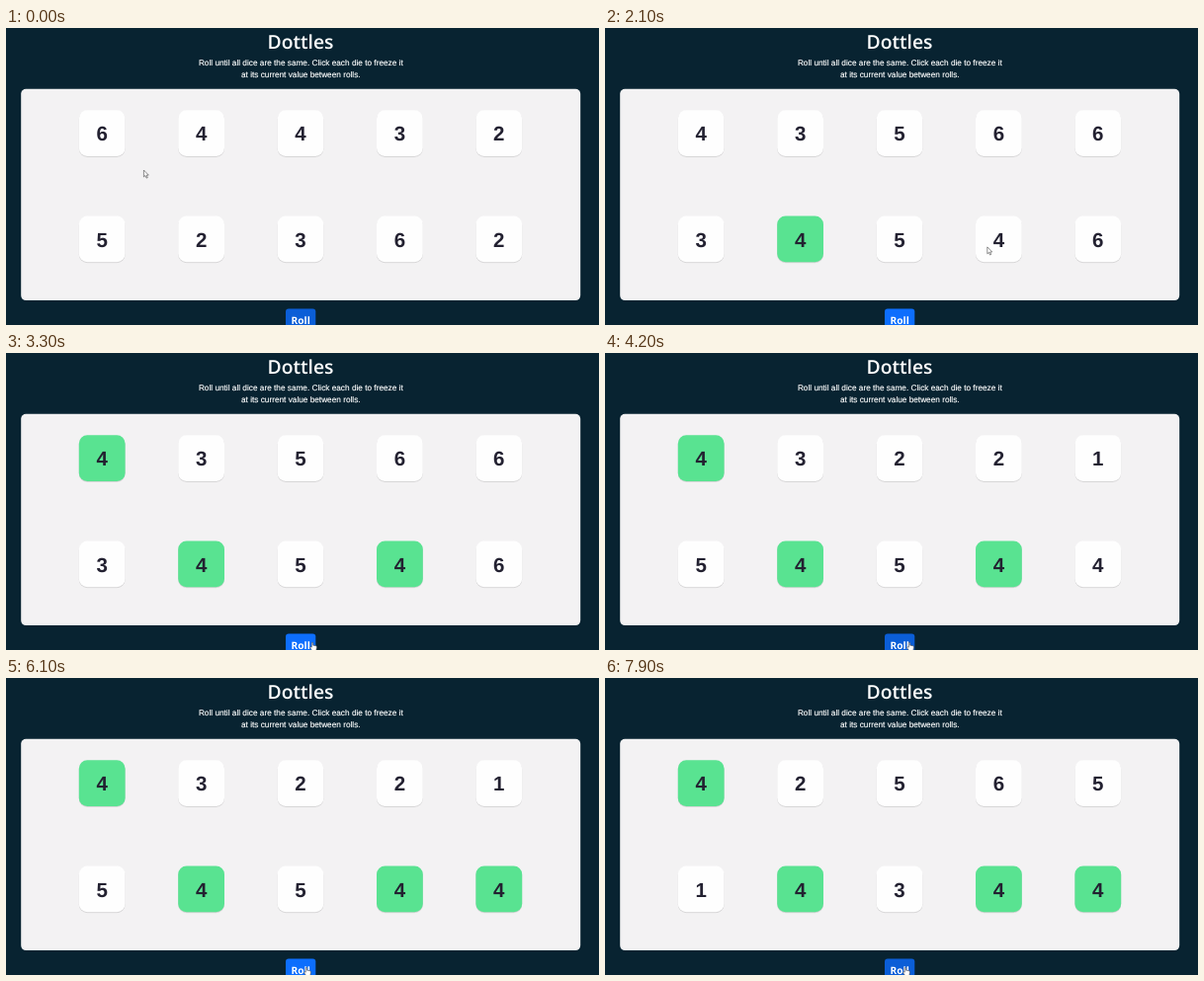
An HTML page that plays this animation: 600 px wide and 301 px high, repeating every 8000 ms.

```html
<!DOCTYPE html>
<html lang="en">
<head>
<meta charset="utf-8">
<title>Dottles</title>
<style>
  html, body { margin: 0; width: 100%; height: 100%; overflow: hidden; background: #082331; }
  svg { display: block; width: 600px; height: 301px; }
  text { text-anchor: middle; fill: #fff; text-rendering: geometricPrecision; }
  .title { font: 600 19.3px "Open Sans", "Noto Sans", sans-serif; }
  .info { font: 8.25px "Liberation Sans", Arial, sans-serif; stroke: #fff; stroke-width: .15px; }
  .label { font: 700 10.2px "Open Sans", "Noto Sans", sans-serif; }
  .num { font: 700 20.5px "Liberation Sans", Arial, sans-serif; fill: #232131; }
</style>
</head>
<body>
<svg viewBox="0 0 600 301">
  <rect width="600" height="301" fill="#082331"/>
  <text class="title" x="298" y="20.8">Dottles</text>
  <text class="info" x="298.3" y="37.5">Roll until all dice are the same. Click each die to freeze it</text>
  <text class="info" x="298.3" y="49.6">at its current value between rolls.</text>
  <rect x="15.2" y="61.8" width="566" height="214.3" rx="5" fill="#f3f2f3"/>
  <g id="dice"></g>
  <rect id="button" x="283" y="284.5" width="30.3" height="22" rx="3"/>
  <text class="label" x="298.2" y="299.9">Roll</text>
  <g id="cursor" stroke="#444" stroke-width=".6" stroke-linejoin="round" fill="#fff">
    <path id="arrow" d="M.4 0V6.9L2 5.5 3.1 8.1 4.3 7.6 3.2 5.1H5.3Z"/>
    <path id="hand" d="M-.7 .7Q0 -.3 .7 .7V3.2L3.6 3.8Q4.6 4.1 4.5 5.2L3.8 8.6H-.4L-2.5 5.4Q-2.4 4.3 -.7 5.2Z"/>
  </g>
</svg>
<script>
const LOOP = 8000, STEP = 100;
const CLICK = 200;  // from arrival to click
const LAG = 300;    // delay of the button's hover colour
const SIZE = 46.8;
const $ = id => document.getElementById(id);

const center = i => ({ x: 97.2 + (i % 5) * 100.4, y: i < 5 ? 106.6 : 213.9 });
const point = (x, y) => ({ x, y });
const onRoll = (dx, faces) => ({ x: 298 + dx, y: 293, faces });
const onDie = (die, dx = 0, dy = 0) => {
  const c = center(die);
  return { x: c.x + dx, y: c.y + dy, die };
};

// The pointer rests at each place from `at` to `till`, then glides to the next.
const visits = [
  { at: -CLICK, till: 100, ...point(139, 144), faces: "6443252362" },
  { at: 500, till: 700, ...onRoll(4, "4356634546") },
  { at: 1100, till: 1100, ...point(300, 239) },
  { at: 1500, till: 1700, ...onDie(6) },
  { at: 2100, till: 2300, ...onDie(8, -12, 8) },
  { at: 2600, till: 2800, ...onDie(0) },
  { at: 3100, till: 3300, ...onRoll(12) },
  { at: 3500, till: 4500, ...onRoll(10, "4322154544") },
  { at: 4900, till: 5600, ...onDie(9, -12, -7) },
  { at: 6100, till: 6500, ...onRoll(6, "4256514344") },
  { at: 6800, till: 6800, ...point(159, 212) },
  { at: 7400, till: LOOP, ...onRoll(6) }
];

function add(tag, attrs) {
  const el = document.createElementNS("http://www.w3.org/2000/svg", tag);
  for (const key in attrs) el.setAttribute(key, attrs[key]);
  return $("dice").appendChild(el);
}

const dice = Array.from({ length: 10 }, (_, i) => {
  const { x, y } = center(i);
  const tile = (drop, style) => add("rect", {
    x: x - SIZE / 2, y: y - SIZE / 2 + drop, width: SIZE, height: SIZE, rx: 8.5, ...style
  });
  tile(1, { opacity: 0.09 });
  tile(0.5, { opacity: 0.06 });
  return { face: tile(0), num: add("text", { class: "num", x, y: y + 7.6 }) };
});

function pointerAt(t) {
  const here = visits.findLast(v => v.at <= t);
  const next = visits[visits.indexOf(here) + 1];
  if (t <= here.till || !next) return here;
  const u = (t - here.till) / (next.at - here.till);
  const k = u * u * (3 - 2 * u);
  return point(here.x + (next.x - here.x) * k, here.y + (next.y - here.y) * k);
}

const overButton = ({ x, y }) => x > 283 && x < 313 && y > 284.5;

function draw(now) {
  const t = Math.floor((now % LOOP) / STEP) * STEP;
  const clicked = visits.filter(v => v.at + CLICK <= t);
  const { faces } = clicked.findLast(v => v.faces);
  dice.forEach(({ face, num }, i) => {
    face.setAttribute("fill", clicked.some(v => v.die === i) ? "#59e391" : "#fefefe");
    num.textContent = faces[i];
  });

  const dark = overButton(pointerAt((t - LAG + LOOP) % LOOP));
  $("button").setAttribute("fill", dark ? "#0b5ed7" : "#0d6efd");

  const p = pointerAt(t);
  const hand = overButton(p);
  $("cursor").setAttribute("transform", `translate(${p.x} ${p.y})`);
  $("arrow").style.display = hand ? "none" : "";
  $("hand").style.display = hand ? "" : "none";
}

const start = performance.now();
function frame() {
  draw(performance.now() - start);
  requestAnimationFrame(frame);
}
frame();
</script>
</body>
</html>
```
